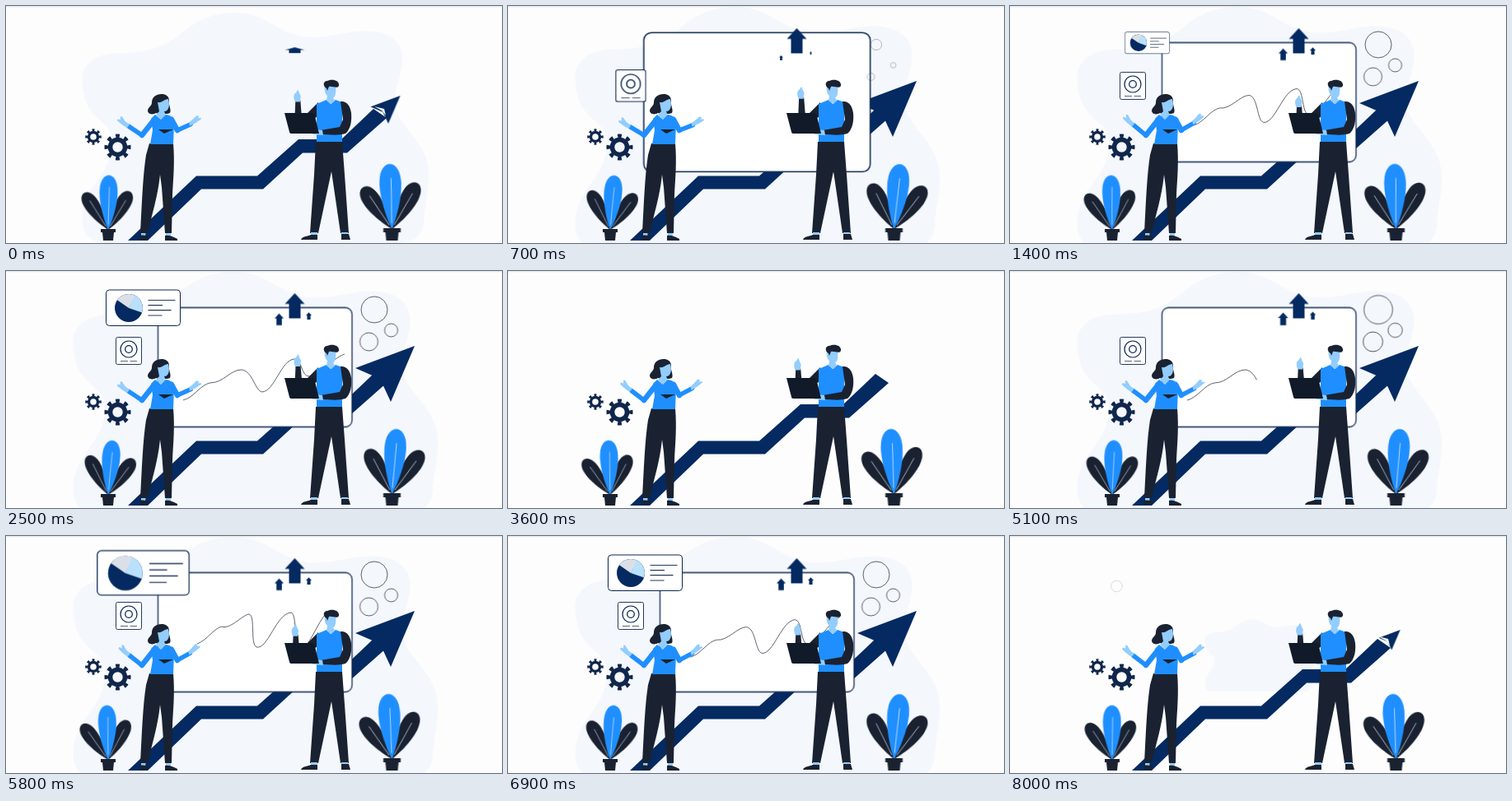
An HTML page for the animation above (8.1 s loop, 602x288 px).

```html
<!DOCTYPE html>
<html lang="en">
<head>
<meta charset="utf-8">
<title>Growth</title>
<style>
@property --s { syntax: "<number>"; inherits: true; initial-value: 0.1; }
html, body { margin: 0; width: 100%; height: 100%; overflow: hidden; background: #fdfdfd; }
svg { display: block; width: 100vw; height: 100vh; }

/* every scene animation shares one cycle */
.blob, .head, .slit, .up, .board, .mini, .card, .line, .ring, .people {
  animation: 4050ms linear infinite;
}
.blob { transform-origin: 302px 144px; animation-name: blob; }
.head { transform-origin: 461px 127px; animation-name: head; }
.slit { animation-name: slit; }
.up { transform-origin: 350px 57.5px; animation-name: up; }
.board { animation-name: board; }
.mini { animation-name: mini; }
.card { transform-origin: 166.5px 44.5px; animation-name: card; }
.line { stroke-dasharray: 1 2; animation-name: wave, trace; }
.ring { animation-name: ring; animation-timing-function: step-end; }
.people { animation-name: arms; animation-timing-function: ease-in-out; }

@keyframes blob {
  0%, 100% { transform: scale(.95); }
  2%, 82% { transform: scale(1); }
  88%, 95% { transform: scale(0); }
  97.53% { transform: scale(.29); }
}
@keyframes head {
  0%, 100% { transform: scale(.5); }
  11.1% { transform: scale(1.32); }
  17%, 82% { transform: scale(1); }
  88%, 93% { transform: scale(0); }
  97.53% { transform: scale(.36); }
}
@keyframes slit {
  0%, 93%, 100% { opacity: 1; }
  3%, 92% { opacity: 0; }
}
@keyframes up {
  0%, 100% { transform: scaleY(.23); }
  5.5% { transform: scaleY(1.28); }
  11%, 82% { transform: scaleY(1); }
  87%, 98.8% { transform: scaleY(0); }
}
@keyframes board {
  0%, 10.4%, 88%, 100% { transform: scale(0); }
  11.1% { transform: scale(.09); }
  17.5% { transform: scale(1.2); }
  23%, 82% { transform: scale(1); }
}
@keyframes mini {
  0%, 15%, 87%, 100% { transform: scale(0); }
  22% { transform: scale(1.25); }
  28%, 82% { transform: scale(1); }
}
@keyframes card {
  0%, 29.6%, 87%, 100% { transform: scale(0); }
  34.57% { transform: scale(.6); }
  40.5% { transform: scale(1.29); }
  43.21% { transform: scale(1.24); }
  47%, 82% { transform: scale(1); }
}
@keyframes trace {
  0%, 22% { stroke-dashoffset: 1; opacity: 0; }
  22.1% { stroke-dashoffset: 1; opacity: 1; }
  32%, 82% { stroke-dashoffset: 0; opacity: 1; }
  86%, 100% { stroke-dashoffset: 0; opacity: 0; }
}
@keyframes wave {
  0%, 26%, 62.5%, 100% {
    animation-timing-function: ease-in-out;
    d: path("M215 157C228 154 236 138 248 136C264 136 272 120 286 120C300 122 302 146 311 147C326 146 334 108 350 107C360 108 358 128 368 128C384 128 392 108 411 101");
  }
  44%, 81% {
    animation-timing-function: ease-in-out;
    d: path("M232 131C245 126 252 112 262 110C272 114 288 95 295 95C303 96 296 131 304 135C318 138 328 94 346 93C354 95 348 135 358 138C366 138 380 102 388 95");
  }
}
@keyframes ring {
  0%, 98.7%, 100% { opacity: 0; }
  96.6% { opacity: 1; }
}
@keyframes arms {
  0%, 100% { --s: .1; }
  11.1% { --s: 1; }
  34.6% { --s: -1; }
  43.2% { --s: -.8; }
  60.5% { --s: .2; }
  70.4%, 97.5% { --s: -.6; }
}
.arm-l { transform-origin: 164px 157px; transform: rotate(calc(var(--s) * -5deg)); }
.arm-r { transform-origin: 207px 152px; transform: rotate(calc(var(--s) * 5deg)); }
.wave-hand { transform: translate(calc(var(--s) * 3px), calc(var(--s) * -6px)); }

.sway { animation: sway 1012.5ms ease-in-out infinite alternate; }
.p1 .sway { --a: 3.2deg; animation-delay: -432.5ms; }
.p2 .sway { --a: 4.4deg; animation-delay: -272.5ms; }
.p1 .side { --a: 4.8deg; }
@keyframes sway {
  from { transform: rotate(calc(var(--a) * -1)); }
  to { transform: rotate(var(--a)); }
}

.navy { fill: #042a61; }
.blue { fill: #1f8fff; }
.dark { fill: #1a2231; }
.skin { fill: #93cdfd; }
.sleeve { fill: none; stroke: #1f8fff; stroke-linecap: round; stroke-linejoin: round; }
.edge { fill: #fff; stroke: #0b2650; }
.thin { fill: none; stroke: #4c525d; stroke-width: .9; }
</style>
</head>
<body>
<svg viewBox="0 0 602 288" preserveAspectRatio="none">
  <defs>
    <g id="leaf">
      <path d="M0 0C-6-12-13-34-11.500-48C-10-69 10-69 11.500-48C13-34 6-12 0 0Z"/>
      <path d="M0-6L1-50" fill="none" stroke="#d5e6fa" stroke-width=".7"/>
    </g>
    <g id="gear" fill="none" stroke="#10264c">
      <circle r="9" stroke-width="5.6"/>
      <circle r="13.5" stroke-width="5" pathLength="16" stroke-dasharray=".9 1.1" stroke-dashoffset=".45"/>
    </g>
    <path id="arrow" d="M0-30.5L12-17.5H7V0H-7V-17.5H-12Z"/>
  </defs>

  <rect width="602" height="288" fill="#fdfdfd"/>
  <path class="blob" fill="#f4f7fc" d="M82 93C78 72 93 55 122 53C160 52 181 50 210 26C232 8 252 1 277 1C309 1 322 18 352 29C388 40 420 21 453 25C481 28 493 45 490 66C488 88 477 104 482 123C488 146 511 160 521 188C529 215 519 240 518 266C517 284 505 296 482 296H110C88 294 80 278 82 260C83 229 109 213 118 184C126 153 113 147 98 133C88 122 83 111 82 93Z"/>
  <rect width="602" height="1.3" fill="#e5e6e9"/>
  <circle class="ring" cx="129.5" cy="61" r="6.8" fill="none" stroke="#d3d6dc" stroke-width=".9"/>

  <path class="navy" d="M148 285L231 206.500H305L355 162H407L446 125L462 136L414 178.500H360L312 222.500H237L172 285Z"/>
  <path class="navy head" d="M424 118L496 91L467 159L454 131Z"/>
  <path class="slit" fill="#f4f7fc" d="M447 122L459 125L461 133L456 127Z"/>

  <g transform="translate(302.500 117.500)">
    <rect class="edge board" x="-118" y="-73" width="235.500" height="145" rx="8" stroke-width="1.300"/>
  </g>

  <use href="#arrow" class="navy up" x="350.500" y="57.500"/>
  <g class="navy">
    <g transform="translate(331.500 66)"><g class="mini"><use href="#arrow" transform="scale(.47)"/></g></g>
    <g transform="translate(367.500 59)"><g class="mini"><use href="#arrow" transform="scale(.29)"/></g></g>
  </g>

  <g class="thin">
    <g transform="translate(447 47)"><circle class="mini" r="16"/></g>
    <g transform="translate(440.500 86)"><circle class="mini" r="11"/></g>
    <g transform="translate(467.500 72)"><circle class="mini" r="8"/></g>
  </g>

  <g transform="translate(149 97)">
    <g class="board">
      <rect class="edge" x="-15.500" y="-16.500" width="31" height="33" rx="2" stroke-width=".9"/>
      <circle class="edge" cy="-2" r="10" stroke-width="1.200"/>
      <circle class="edge" cy="-2" r="4.300" stroke-width="1.300"/>
      <path class="thin" d="M-10 12.500H-1M1.500 12.500H10"/>
    </g>
  </g>

  <g class="card">
    <rect class="edge" x="121.500" y="23" width="90" height="43.500" rx="4" stroke-width="1"/>
    <circle class="navy" cx="149" cy="45" r="17"/>
    <path fill="#dbe0e8" d="M149 45L135 35.300A17 17 0 0 1 157 30Z"/>
    <path fill="#b9e1fb" d="M149 45L156 29.500A17 17 0 0 1 165 50.500Z"/>
    <path fill="none" stroke="#26395c" stroke-width="1.200" d="M172.500 35.500H205.500M172.500 41.700H190M172.500 47.700H200.500M172.500 54H189.500"/>
  </g>

  <path class="thin line" pathLength="1" d="M215 157C228 154 236 138 248 136C264 136 272 120 286 120C300 122 302 146 311 147C326 146 334 108 350 107C360 108 358 128 368 128C384 128 392 108 411 101"/>

  <use href="#gear" transform="translate(135.500 171.500)"/>
  <use href="#gear" transform="translate(106 159) scale(.61)"/>

  <g class="p1" transform="translate(124 272)">
    <g class="sway side">
      <use href="#leaf" class="dark" transform="rotate(-32) scale(.78 .84)"/>
      <use href="#leaf" class="dark" transform="rotate(31) scale(.78 .84)"/>
    </g>
    <g class="sway"><use href="#leaf" class="blue" transform="rotate(1.500) scale(.94 1.040)"/></g>
    <path class="dark" d="M-9-1H9V3H7L6 13H-6L-7 3H-9Z"/>
  </g>
  <g class="p2" transform="translate(468.500 271)">
    <g class="sway side">
      <use href="#leaf" class="dark" transform="rotate(-32) scale(.92 .97)"/>
      <use href="#leaf" class="dark" transform="rotate(32) scale(.92 1)"/>
    </g>
    <g class="sway"><use href="#leaf" class="blue" transform="rotate(1) scale(1.130 1.240)"/></g>
    <path class="dark" d="M-10.500-1H10.500V4H8L7 14H-7L-8 4H-10.500Z"/>
  </g>

  <g class="people">
    <!-- woman -->
    <path class="dark" d="M180 110C186 105 198 106 198 115C197 121 201 125 199 130C194 132 186 131 182 130C177 133 172 131 172 127C173 122 177 122 177 117C177 114 178 112 180 110Z"/>
    <path class="skin" d="M184 117C190 118 192 113 197 113C199 120 198 128 192 128L194 133L188 138L182 132L186 128Z"/>
    <path class="skin" d="M164 273H170L169 280H164ZM194 274H200V281H194Z"/>
    <path class="dark" d="M174 167H203C205 190 203 210 202 229L201 276H193L189 220L187 205C184 233 177 253 172 276H163C165 239 166 207 170 181Z"/>
    <path class="dark" d="M163 279C167 278 171 279 173 281V284H162ZM193 279C198 278 202 280 208 283V285H193Z"/>
    <path class="sleeve" stroke-width="6.500" d="M180 138L165 157M201 138L208 151"/>
    <g class="arm-l">
      <path class="sleeve" stroke-width="5.500" d="M165 157L149 146"/>
      <path class="skin" d="M147 148L141 144L135 139L136 137L139 138L139 134L141 134L145 140L150 144Z"/>
    </g>
    <g class="arm-r">
      <path class="sleeve" stroke-width="5.500" d="M208 151L224 143.500"/>
      <path class="skin" d="M223 145.500L230 142L237 137L236 135.500L233 136L234 133.500L231 133L226 138L222 141Z"/>
    </g>
    <path class="blue" d="M181 132L188 138L194 132C201 133 205 137 204 142L203 168H175L178 151L176 137Z"/>
    <path class="dark" d="M185 150L203 150L192 155Z"/>

    <!-- man -->
    <g class="wave-hand">
      <path class="dark" d="M351 116L357 115L359 140H350Z"/>
      <path class="skin" d="M350.500 117C348 111 349 107 351.500 106L354 102L356 107L357.500 110L356.500 117Z"/>
    </g>
    <path class="dark" d="M379 117L366 130L358 136L364 143L380 133Z"/>
    <path class="dark" d="M376 165H408L411 205L416 276H406L395 201L379 276H369L374 205Z"/>
    <path class="skin" d="M370 275H378V280H370ZM407 275H415V280H407Z"/>
    <path class="dark" d="M358 284C359 280 366 280 370 278H378V284ZM407 277H416L418 284H407Z"/>
    <path class="blue" d="M377 119L389 114L394 119L400 114L408 117V165H377Z"/>
    <path class="skin" d="M387 96H400C401 104 400 111 397 111L399 115L395 119L389 115L390 109C387 107 386 101 387 96Z"/>
    <path class="dark" d="M389 100C384 97 385 91 390 91C396 88 405 90 404 97C402 101 396 97 392 98L390 103Z"/>
    <path class="dark" d="M406 116C414 115 418 122 419 130C420 140 418 150 412 155C402 158 392 156 383 156L382 151L405 147L409 138Z"/>
    <path class="skin" d="M384 151L376 150L370 152L372 156L385 157Z"/>
    <path fill="#111a29" d="M338 130H371C373 130 374 131 374.500 132L380 155H346C345 155 344 154 344 153Z"/>
  </g>
</svg>
</body>
</html>
```
